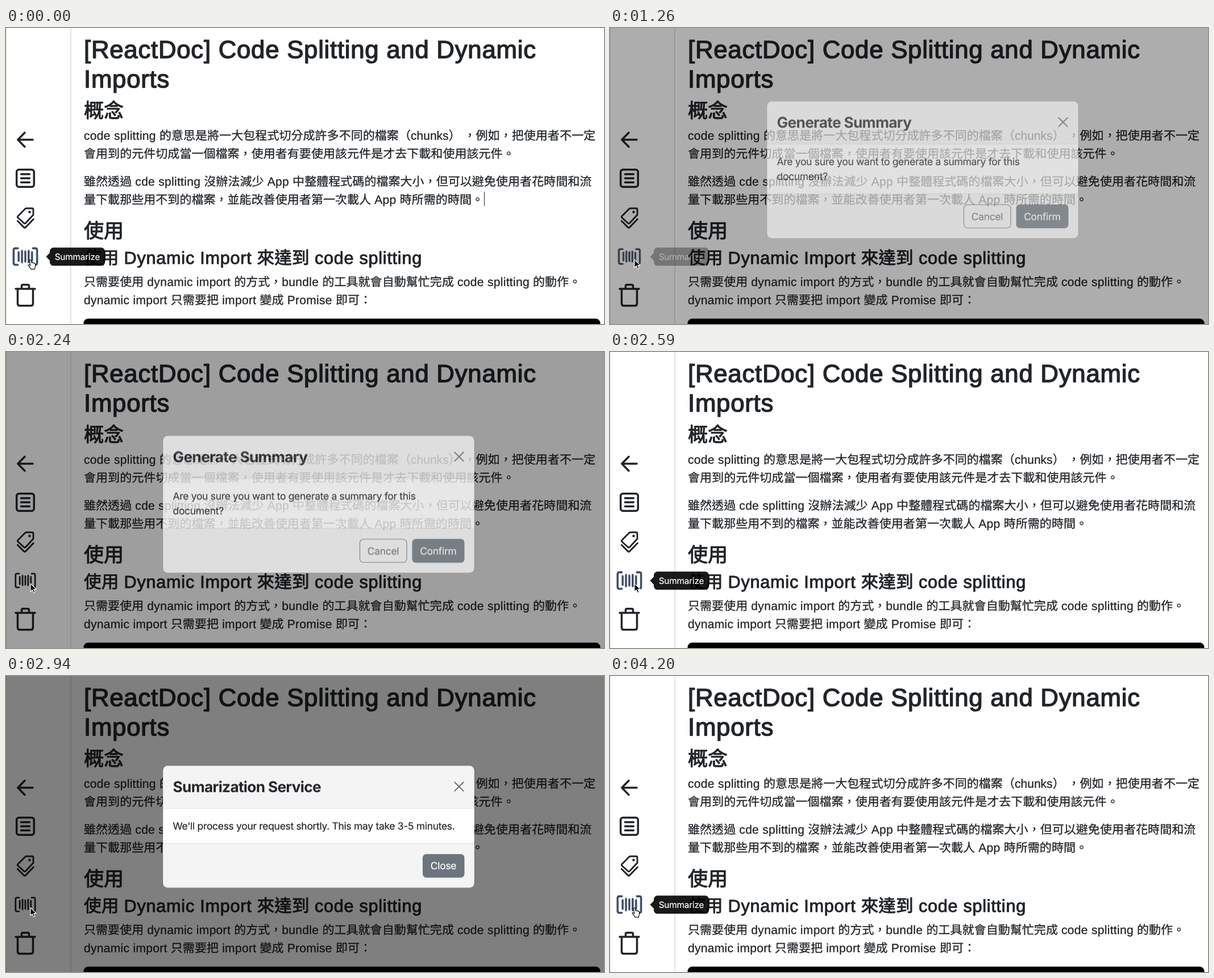
Write an HTML page that moves like this. It is 1052 px wide and 522 px high and loops after 4.27 s.

```html
<!DOCTYPE html>
<html lang="zh-Hant-TW">
<head>
<meta charset="utf-8">
<title>Summarize document</title>
<style>
  html, body { margin: 0; width: 100%; height: 100%; overflow: hidden; background: #fff; }
  svg { display: block; width: 1052px; height: 522px; }

  text { fill: #212529; white-space: pre; text-rendering: geometricPrecision; }
  .doc { font-family: "Liberation Sans", "Noto Sans CJK TC", "Noto Sans CJK", sans-serif; font-size: 21.05px; }
  .doc text { stroke: #212529; stroke-width: .3px; stroke-linejoin: round; }
  .doc tspan { letter-spacing: .0135em; }
  .doc .h1 { font-size: 43.84px; letter-spacing: .016em; stroke-width: 1.4px; }
  .doc .h2 { font-size: 35.1px; stroke-width: 1.1px; }
  .doc .h3 { font-size: 30.7px; stroke-width: .95px; }
  .doc .h3 tspan { letter-spacing: .023em; }

  .ui text { font-family: Inter, sans-serif; font-size: 17.54px; letter-spacing: -.019em; stroke: #212529; stroke-width: .2px; }
  .ui .title { font-size: 26.3px; font-weight: 700; letter-spacing: -.027em; stroke: none; }
  .ui .label { text-anchor: middle; }
  .ui .white { fill: #fff; stroke: #fff; }
  .ui .gray { fill: #6c757d; stroke: #6c757d; }
  .tip text { font-size: 15.35px; letter-spacing: -.012em; fill: #fff; stroke: #fff; }

  .icon { fill: none; stroke: #212529; stroke-width: 3.5; stroke-linecap: round; stroke-linejoin: round; }
  .scan { stroke-width: 2.8; transform-origin: 34px 403px; }

  .caret, .ring, .hand, .arrow { animation: caret 4.27s steps(1, end) infinite; }
  .ring { animation-name: ring; }
  .hand { animation-name: hand; }
  .arrow { animation-name: arrow; }
  .dim, .tip, .scan { animation: dim 4.27s linear infinite; }
  .tip { animation-name: tip; }
  .scan { animation-name: scan; }
  .ask { animation: fade-ask 4.27s linear infinite, slide-ask 4.27s ease-out infinite; }
  .done { animation: fade-done 4.27s linear infinite, slide-done 4.27s ease-out infinite; }

  @keyframes caret { 0% { opacity: 1 } 3.279% { opacity: 0 } 16.393% { opacity: 1 } 24.59%, 100% { opacity: 0 } }
  @keyframes ring { 0% { opacity: 0 } 24.59% { opacity: 1 } 27.283%, 100% { opacity: 0 } }
  @keyframes hand { 0% { opacity: 1 } 24.59% { opacity: 0 } 96.721%, 100% { opacity: 1 } }
  @keyframes arrow { 0% { opacity: 0 } 24.59% { opacity: 1 } 96.721%, 100% { opacity: 0 } }

  @keyframes dim {
    0%, 27.283%, 55.152%, 61.71%, 89.625%, 100% { opacity: 0 }
    30.796%, 51.639%, 65.222%, 86.112% { opacity: .5 }
  }
  @keyframes tip {
    0%, 27.283%, 59.836%, 61.71%, 94.239%, 100% { opacity: 1 }
    30.796%, 56.323%, 65.222%, 90.726% { opacity: 0 }
  }
  @keyframes scan {
    0%, 24.58%, 59.836%, 61.71%, 94.239%, 100% { transform: scale(1.2); stroke: #34435e }
    24.59%, 27.283% { transform: scale(1.2); stroke: #7489b5 }
    30.796%, 56.323%, 65.222%, 90.726% { transform: scale(1); stroke: #212529 }
  }
  @keyframes fade-ask { 0%, 27.283%, 55.152%, 100% { opacity: 0 } 30.796%, 51.639% { opacity: 1 } }
  @keyframes slide-ask {
    0%, 27.283%, 58.665%, 100% { transform: translateY(-54.8px) }
    34.309%, 51.639% { transform: translateY(0) }
  }
  @keyframes fade-done { 0%, 61.71%, 89.625%, 100% { opacity: 0 } 65.222%, 86.112% { opacity: 1 } }
  @keyframes slide-done {
    0%, 61.71%, 93.138%, 100% { transform: translateY(-54.8px) }
    68.735%, 86.112% { transform: translateY(0) }
  }
</style>
</head>
<body>
<svg viewBox="0 0 1052 522" width="1052" height="522">
  <rect width="1052" height="522" fill="#fff"/>
  <rect width="1" height="522" fill="#ddd"/>
  <rect x="113.4" width="1.2" height="522" fill="#cfd1d3"/>

  <g class="doc">
    <text class="h1" x="137" y="52.5">[ReactDoc] Code Splitting and Dynamic</text>
    <text class="h1" x="137" y="105">Imports</text>
    <text class="h2" x="137" y="157.7">概念</text>
    <text x="137" y="197.2"><tspan>code splitting </tspan>的意思是將一大包程式切分成許多不同的檔案（chunks） ，例如，把使用者不一定</text>
    <text x="137" y="228.8">會用到的元件切成當一個檔案，使用者有要使用該元件是才去下載和使用該元件。</text>
    <text x="137" y="278">雖然透過<tspan> cde splitting </tspan>沒辦法減少<tspan> App </tspan>中整體程式碼的檔案大小，但可以避免使用者花時間和流</text>
    <text x="137" y="309.5">量下載那些用不到的檔案，並能改善使用者第一次載人<tspan> App </tspan>時所需的時間。</text>
    <text class="h2" x="137" y="370.3">使用</text>
    <text class="h3" x="137" y="416">使用<tspan> Dynamic Import </tspan>來達到<tspan> code splitting</tspan></text>
    <text x="137" y="455.2">只需要使用<tspan> dynamic import </tspan>的方式，<tspan>bundle </tspan>的工具就會自動幫忙完成<tspan> code splitting </tspan>的動作。</text>
    <text x="137" y="486.8"><tspan>dynamic import </tspan>只需要把<tspan> import </tspan>變成<tspan> Promise </tspan>即可：</text>
  </g>
  <rect class="caret" x="841" y="289" width="1" height="25" fill="#212529"/>
  <rect x="136.5" y="512.6" width="909" height="40" rx="8"/>

  <rect class="ring" x="-6" y="370.5" width="78" height="65" rx="5" fill="#fff" stroke="#c3cee3" stroke-width="1.2"/>

  <g class="icon">
    <path d="M33 184.5L20.8 197L33 209.5M21.5 197H47"/>
    <rect x="18.7" y="249.7" width="30.6" height="30.6" rx="4"/>
    <path d="M26.5 257.8H41.5M26.5 265H41.5M26.5 272.2H41.5"/>
    <path d="M36 318H46Q48 318 48 320V329.5L34.6 344Q33 345.6 31.4 344L21 334.5Q19.6 333.2 21 331.8L33.6 319Q34.6 318 36 318Z" stroke-width="2.9"/>
    <path d="M20.3 340.3L31.4 351.4Q33 353 34.6 351.4L48.4 337" stroke-width="2.9"/>
    <circle cx="41.5" cy="324.5" r="1.3" stroke-width="2"/>
    <path d="M17 460H51M27.5 459V455Q27.5 452.8 29.7 452.8H38.3Q40.5 452.8 40.5 455V459M20.5 461V486Q20.5 489.8 24.3 489.8H43.7Q47.5 489.8 47.5 486V461"/>
  </g>
  <path class="icon scan" d="M23 390.9H19.3Q16.8 390.9 16.8 393.4V412.6Q16.8 415.1 19.3 415.1H23M45 390.9H48.7Q51.2 390.9 51.2 393.4V412.6Q51.2 415.1 48.7 415.1H45M24.2 396.5V409.5M29.1 394.5V411.5M34 395.5V410.5M38.9 394.5V411.5M43.8 396.5V409.5"/>

  <g class="ui tip">
    <path d="M83.5 387.3H167.5A6.5 6.5 0 0 1 174 393.8V412.8A6.5 6.5 0 0 1 167.5 419.3H83.5A6.5 6.5 0 0 1 77 412.8V410L70.5 403.3L77 396.6V393.8A6.5 6.5 0 0 1 83.5 387.3Z" fill-opacity=".9"/>
    <text x="85.7" y="409">Summarize</text>
  </g>

  <rect class="dim" width="1052" height="522"/>

  <g class="ui ask">
    <rect x="276" y="158" width="548" height="242" rx="8.5" fill="#f4f4f4"/>
    <rect x="276" y="233.5" width="548" height="88" fill="#fff"/>
    <path d="M276 233.5H824M276 321.5H824" stroke="#dcdfe2"/>
    <rect x="276" y="158" width="548" height="242" rx="8.5" fill="none" stroke="#000" stroke-opacity=".175"/>
    <text class="title" x="293.5" y="205">Generate Summary</text>
    <path d="M789.3 187.3L804.7 202.7M804.7 187.3L789.3 202.7" stroke="#6a6a6a" stroke-width="1.9" stroke-linecap="round"/>
    <text x="293.5" y="270.5">Are you sure you want to generate a summary for this</text>
    <text x="293.5" y="296.8">document?</text>
    <rect x="622.5" y="340.5" width="82.5" height="41" rx="6.5" fill="none" stroke="#6c757d" stroke-width="1.1"/>
    <text class="label gray" x="663.5" y="367.4">Cancel</text>
    <rect x="714.5" y="340" width="92" height="42" rx="6.5" fill="#6c757d"/>
    <text class="label white" x="760.3" y="367.4">Confirm</text>
  </g>

  <g class="ui done">
    <rect x="276" y="158" width="548" height="215.5" rx="8.5" fill="#f4f4f4"/>
    <rect x="276" y="233.5" width="548" height="62" fill="#fff"/>
    <path d="M276 233.5H824M276 295.5H824" stroke="#dcdfe2"/>
    <rect x="276" y="158" width="548" height="215.5" rx="8.5" fill="none" stroke="#000" stroke-opacity=".175"/>
    <text class="title" x="293.5" y="205">Sumarization Service</text>
    <path d="M789.3 187.3L804.7 202.7M804.7 187.3L789.3 202.7" stroke="#6a6a6a" stroke-width="1.9" stroke-linecap="round"/>
    <text x="293.5" y="270.5">We'll process your request shortly. This may take 3-5 minutes.</text>
    <rect x="733" y="314" width="73.5" height="41.5" rx="6.5" fill="#6c757d"/>
    <text class="label white" x="769.5" y="341">Close</text>
  </g>

  <path class="arrow" d="M43 408.3V422.6L46.3 419.5L48.6 424.8L51 423.8L48.8 418.6H53.2Z" fill="#000" stroke="#fff" stroke-width="1.1" stroke-linejoin="round"/>
  <path class="hand" d="M41.3 410.6Q41 409 42.3 408.8Q43.5 408.6 44 410.2L45.3 414.3Q45.8 413.2 46.9 413.7L47.5 414.5Q48.5 413.6 49.5 414.8Q50.6 414.2 51.2 415.6Q51.9 418 51.4 420.6L50.4 425.4H43.9Q42.6 422.2 39.3 418.9Q38.6 417.6 39.8 417.2Q41 417 42.9 419Z" fill="#fff" stroke="#000" stroke-width="1.1" stroke-linejoin="round"/>
</svg>
</body>
</html>
```
